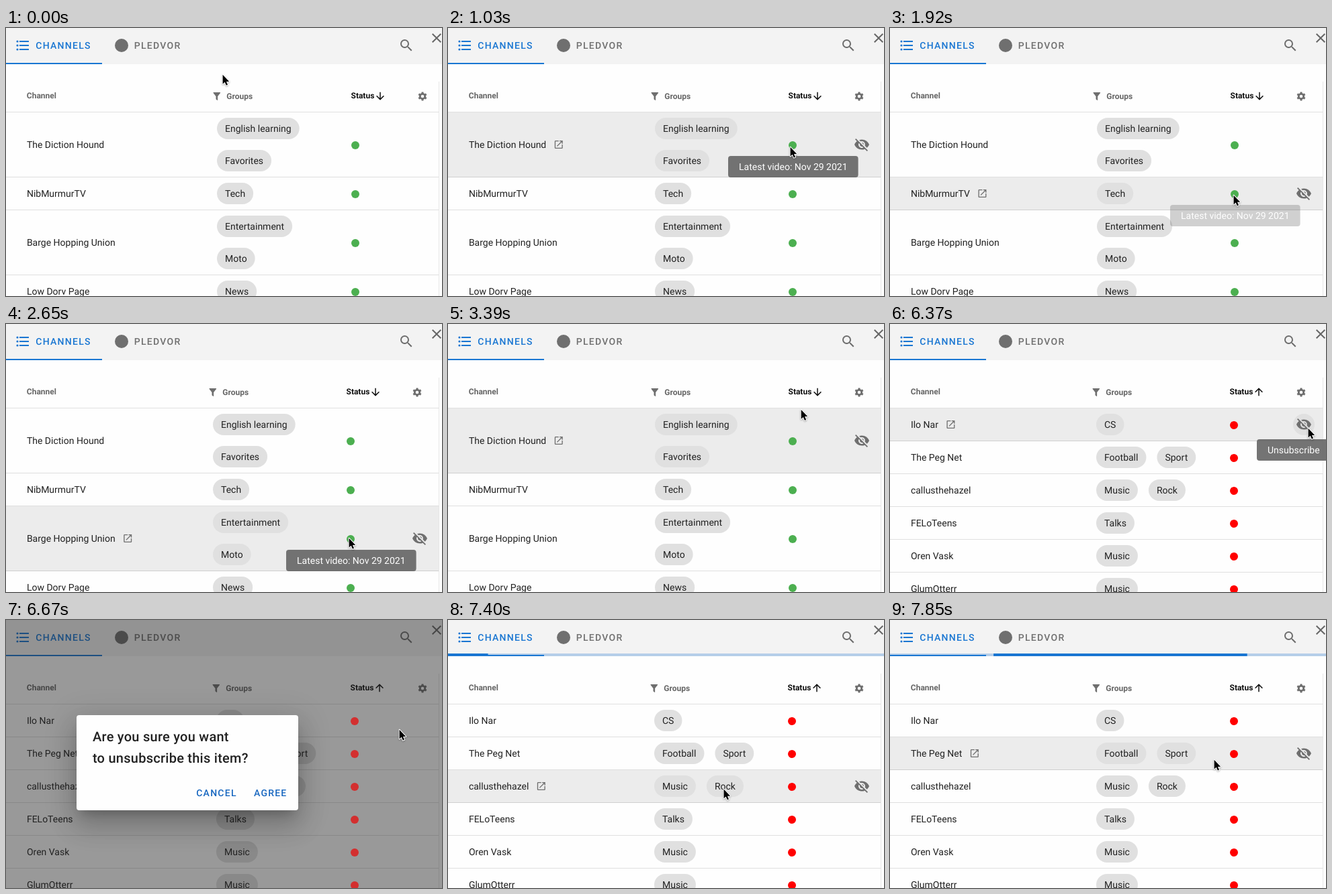
These frames come from a looping animation (649 px wide and 400 px high, 8 s). An HTML page:

```html
<!DOCTYPE html>
<html lang="en">
<head>
<meta charset="utf-8">
<title>Channel list</title>
<style>
  html, body { margin: 0; width: 649px; height: 400px; overflow: hidden; background: #fefefe; }
  svg { display: block; font: 14px Roboto, sans-serif; fill: #212121; text-rendering: geometricPrecision; }
  .caps { font-weight: 500; letter-spacing: 1.25px; }
  .th { font-size: 12px; font-weight: 700; }
  .title { font-size: 20px; font-weight: 500; letter-spacing: .25px; }
  .cursor {
    fill: #000; stroke: #fff; stroke-width: 2; stroke-linejoin: round; paint-order: stroke;
    filter: drop-shadow(0 1px 1px rgba(0, 0, 0, .3));
  }
</style>
</head>
<body>
<svg id="stage" width="649" height="400" viewBox="0 0 649 400"></svg>
<script>
const LOOP = 8000;
const BLUE = '#1976d2', GREY = '#6f6f6f';

// Bursts of movement: start, end, number of steps
const BURSTS = [
  [140, 1030, 7], [1620, 2060, 4], [2360, 2650, 3], [2950, 3540, 5],
  [4130, 5030, 7], [5180, 5330, 2], [5780, 6810, 8], [6960, 7850, 7]
];
const TICKS = [0, ...BURSTS.flatMap(([a, b, n]) =>
  Array.from({ length: n }, (_, i) => Math.floor((a + (b - a) * i / (n - 1)) / 10) * 10))];

// Pointer path: time, x, y
const PATH = [
  [0, 322, 69], [780, 509, 177], [1500, 509, 177], [1920, 511, 249],
  [2230, 511, 249], [2510, 510, 319], [2820, 510, 319], [3540, 527, 103],
  [4130, 527, 103], [4580, 522, 145], [5030, 515, 151], [5180, 513, 153],
  [5650, 513, 153], [6220, 622, 155], [6440, 622, 155], [6660, 585, 163],
  [6960, 440, 250], [7110, 398, 259], [7260, 398, 259], [7850, 482, 208]
];

// Tooltips: fade-in start and end, fade-out start and end, left, top, label
const LATEST = 'Latest video: Nov 29 2021';
const TIPS = [
  [800, 1000, 1620, 1760, 417, 191, LATEST],
  [1840, 2050, 2360, 2500, 417, 264, LATEST],
  [2420, 2640, 2950, 3090, 417, 337, LATEST],
  [5090, 5270, 5780, 5920, 450, 167, 'Latest video: —'],
  [6140, 6360, 6440, 6600, 546, 172, 'Unsubscribe']
];

const NEWEST = [
  ['The Diction Hound', 'English learning', 'Favorites'],
  ['NibMurmurTV', 'Tech'],
  ['Barge Hopping Union', 'Entertainment', 'Moto'],
  ['Low Dorv Page', 'News']
];
const OLDEST = [
  ['Ilo Nar', 'CS'],
  ['The Peg Net', 'Football', 'Sport'],
  ['callusthehazel', 'Music', 'Rock'],
  ['FELoTeens', 'Talks'],
  ['Oren Vask', 'Music'],
  ['GlumOtterr', 'Music']
];

const ICONS = {
  search: 'M9.5 3A6.5 6.5 0 0 1 16 9.5C16 11.11 15.41 12.59 14.44 13.73L14.71 14H15.5L20.5 19L19 20.5L14 15.5V14.71L13.73 14.44A6.5 6.5 0 1 1 9.5 3M9.5 5A4.5 4.5 0 1 0 9.5 14A4.5 4.5 0 1 0 9.5 5Z',
  close: 'M19 6.41L17.59 5L12 10.59L6.41 5L5 6.41L10.59 12L5 17.59L6.41 19L12 13.41L17.59 19L19 17.59L13.41 12Z',
  filter: 'M14 12V20Q14 21 13 21L10 18.3V12L4.2 4.6Q3.5 3.2 5 3H19Q20.5 3.2 19.8 4.6Z',
  arrow: 'M11 4H13V16L18.5 10.5L19.92 11.92L12 19.84L4.08 11.92L5.5 10.5L11 16Z',
  open: 'M14 3V5H17.59L7.76 14.83L9.17 16.24L19 6.41V10H21V3M19 19H5V5H12V3H5A2 2 0 0 0 3 5V19A2 2 0 0 0 5 21H19A2 2 0 0 0 21 19V12H19Z',
  hide: 'M11.83 9L15 12.16V12A3 3 0 0 0 12 9ZM7.53 9.8L9.08 11.35A3 3 0 0 0 12.65 14.92L14.2 16.47A5 5 0 0 1 7.53 9.8M2 4.27L4.73 7C3.08 8.3 1.78 10 1 12C2.73 16.39 7 19.5 12 19.5C13.55 19.5 15.03 19.2 16.38 18.66L19.73 22L21 20.73L3.27 3M12 7A5 5 0 0 1 16.64 13.82L19.57 16.75C21.07 15.5 22.27 13.86 23 12C21.27 7.61 17 4.5 12 4.5C10.6 4.5 9.26 4.75 8 5.2L10.17 7.35C10.74 7.13 11.35 7 12 7Z'
};

const pen = document.createElement('canvas').getContext('2d');
function widthOf(s) {
  pen.font = '14px Roboto, sans-serif';
  pen.textRendering = 'geometricPrecision';
  return pen.measureText(s).width;
}
const clamp = v => Math.max(0, Math.min(1, v));
const ramp = (t, a, b) => clamp((t - a) / (b - a));
const smooth = v => v * v * (3 - 2 * v);

// The CSS "ease" curve
function ease(x) {
  let lo = 0, hi = 1;
  for (let i = 0; i < 24; i++) {
    const s = (lo + hi) / 2;
    if (.75 * s * (1 - s) + s ** 3 < x) lo = s; else hi = s;
  }
  const r = 1 - lo;
  return .3 * r * r * lo + 3 * r * lo * lo + lo ** 3;
}

const rect = (x, y, w, h, fill, rx = 0, extra = '') =>
  `<rect x="${x}" y="${y}" width="${w}" height="${h}" rx="${rx}" fill="${fill}" ${extra}/>`;
const circle = (x, y, r, fill) => `<circle cx="${x}" cy="${y}" r="${r}" fill="${fill}"/>`;
const text = (x, y, s, fill = '#212121', cls = '') =>
  `<text x="${x}" y="${y}" fill="${fill}" class="${cls}">${s}</text>`;
const icon = (name, x, y, size = 24, fill = GREY) =>
  `<path d="${ICONS[name]}" transform="translate(${x} ${y}) scale(${size / 24})" fill="${fill}" fill-rule="evenodd"/>`;

function pointerAt(t) {
  const i = Math.max(1, PATH.findIndex(k => k[0] >= t));
  const [a, x, y] = PATH[i - 1], [b, u, v] = PATH[i];
  const p = smooth(ramp(t, a, b));
  return [x + (u - x) * p, y + (v - y) * p];
}

function layRows(list, stacked) {
  let y = 126;
  return list.map(([name, ...chips]) => {
    const h = stacked ? 48 * chips.length : 48;
    const row = { name, chips, y, h, mid: y + h / 2, stacked };
    y += h + 1;
    return row;
  });
}
const TABLES = { newest: layRows(NEWEST, true), oldest: layRows(OLDEST, false) };

function tabs() {
  let s = rect(0, 0, 649, 54, '#f3f3f3');
  for (const y of [20, 26, 32]) s += circle(17, y, 1.6, BLUE) + rect(20, y - 1, 14, 2, BLUE);
  return s + text(44.3, 31, 'CHANNELS', BLUE, 'caps')
    + circle(172, 26, 10, GREY) + text(190.8, 31, 'PLEDVOR', GREY, 'caps')
    + icon('search', 584, 14) + icon('close', 629, 3, 24, '#666');
}

function progress(t) {
  if (t < 7280) return '';
  const w = 678.6, e = ease(ramp(t, 7280, 8600));
  const left = (3.07 * e - 2) * w, right = 1.08 * e * w;
  return rect(0, 50, 649, 4, '#b5cee9') + rect(left, 50, right - left, 4, BLUE);
}

function gear(x, y) {
  let s = `<circle cx="${x}" cy="${y}" r="3.7" fill="none" stroke="${GREY}" stroke-width="2.8"/>`;
  for (let a = 0; a < 360; a += 60)
    s += rect(x - 1.5, y - 6.6, 3, 2.6, GREY, .4, `transform="rotate(${a} ${x} ${y})"`);
  return s;
}

function head(col, ascending) {
  const ax = col.status + 43;
  const turn = ascending ? `transform="rotate(180 ${ax} 101.5)"` : '';
  return text(30.8, 105, 'Channel', '#666', 'th')
    + icon('filter', col.group - 8.2, 94, 16) + text(col.group + 14.3, 106, 'Groups', '#666', 'th')
    + text(col.status - .5, 105, 'Status', '#111', 'th')
    + `<g ${turn}>${icon('arrow', ax - 9, 92.8, 18, '#111')}</g>`
    + gear(col.gear, 102) + rect(0, 125, 644, 1, '#e0e0e0');
}

function chipSet(row, x) {
  let y = row.mid - (row.stacked ? 24 * (row.chips.length - 1) : 0);
  return row.chips.map(label => {
    const w = widthOf(label) + 24;
    const s = rect(x, y - 16, w, 32, '#e0e0e0', 16) + text(x + 12, y + 5, label);
    if (row.stacked) y += 48; else x += w + 16;
    return s;
  }).join('');
}

function rowView(row, col, on, px, py) {
  let s = on ? rect(0, row.y, 644, row.h + 1, '#ececec') : '';
  s += rect(0, row.y + row.h, 644, 1, '#000', 0, 'opacity=".12"')
    + text(30.9, row.mid + 5, row.name) + chipSet(row, col.group);
  if (on) {
    if (Math.hypot(px - 616, py - row.mid) < 18) s += circle(616, row.mid, 16, '#e0e0e0');
    s += icon('open', 41.4 + widthOf(row.name), row.mid - 8, 16) + icon('hide', 604, row.mid - 12);
  }
  return s;
}

function tooltip([a, b, c, d, x, y, label], t) {
  const o = ramp(t, a, b) * (1 - ramp(t, c, d));
  if (!o) return '';
  return `<g opacity="${o}">${rect(x, y, widthOf(label) + 32, 32, '#616161', 4, 'opacity=".88"')}`
    + text(x + 16, y + 21, label, '#fff') + '</g>';
}

const shade = (dy, blur, spread, alpha) =>
  rect(105 - spread, 142 + dy - spread, 330 + 2 * spread, 142 + 2 * spread, '#000', 4,
    `opacity="${alpha}" style="filter:blur(${blur / 2}px)"`);

function dialog(p) {
  if (!p) return '';
  const k = .5 + .5 * p;
  return `<g opacity="${p}" transform="translate(270 213) scale(${k}) translate(-270 -213)">`
    + shade(11, 15, -7, .2) + shade(24, 38, 3, .14) + shade(9, 46, 8, .12)
    + rect(105, 142, 330, 142, '#fefefe', 4)
    + text(129, 181, 'Are you sure you want', '#212121', 'title')
    + text(129, 213, 'to unsubscribe this item?', '#212121', 'title')
    + text(283.2, 263, 'CANCEL', '#1867c0', 'caps') + text(369, 263, 'AGREE', '#1867c0', 'caps') + '</g>';
}

function view(t) {
  const [px, py] = pointerAt(t);
  const ascending = t >= 4130;
  const rows = ascending ? TABLES.oldest : TABLES.newest;
  const open = smooth(ramp(t, 6430, 6600) * (1 - ramp(t, 7180, 7380)));
  const hover = open ? null : rows.find(r => py >= r.y && py <= r.y + r.h);
  const nudge = ascending ? 1 : 0;
  const col = hover
    ? { group: 308 - nudge, status: 507 - nudge, gear: 612 }
    : { group: 314 - nudge, status: 514 - nudge, gear: 620 };
  const dot = ascending ? `rgb(${255 - 44 * open},${47 * open},${47 * open})` : '#4caf50';

  return rect(0, 0, 649, 400, '#fefefe') + tabs() + progress(t) + rect(0, 52, 143, 2, BLUE)
    + rect(644, 80, 1, 320, '#e6e6e6') + head(col, ascending)
    + rows.map(r => rowView(r, col, r === hover, px, py)).join('')
    + (open ? rect(0, 0, 649, 400, '#212121', 0, `opacity="${.46 * open}"`) : '')
    + rows.map(r => circle(col.status + 6, r.mid + 1, 6, dot)).join('')
    + dialog(open) + TIPS.map(tip => tooltip(tip, t)).join('')
    + `<path class="cursor" transform="translate(${px + .6} ${py + .8})" d="M0 0V13.8L3.1 10.9L5.2 15.8L7.4 14.9L5.4 10.1H9.6Z"/>`;
}

const stage = document.getElementById('stage');
const start = performance.now();
let shown = -1;

function frame() {
  const t = (performance.now() - start) % LOOP;
  const tick = TICKS.filter(k => k <= t).pop() ?? 0;
  if (tick !== shown) {
    stage.innerHTML = view(tick);
    shown = tick;
  }
  requestAnimationFrame(frame);
}
frame();
</script>
</body>
</html>
```
